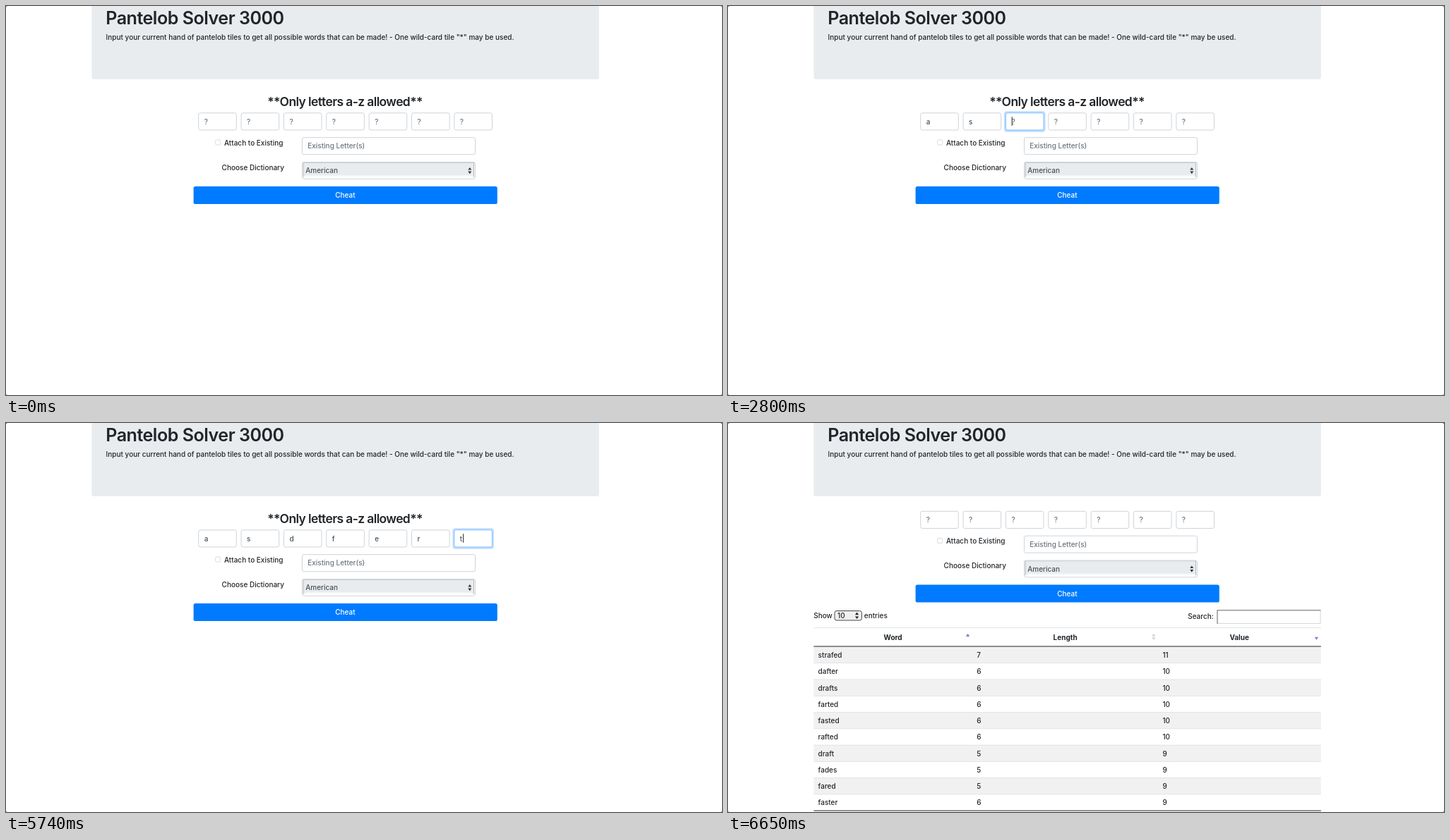
An HTML page for the animation above (8 s loop, 1014 by 552 pixels).

```html
<!DOCTYPE html>
<html lang="en">
<head>
<meta charset="utf-8">
<title>Word finder</title>
<style>
  html, body { margin: 0; width: 100%; height: 100%; overflow: hidden; background: #fff; }
  svg { display: block; width: 1014px; height: 552px; }
  text { font: 500 10px Inter, "Open Sans", sans-serif; font-optical-sizing: none; fill: #212529; white-space: pre; }
  .h1 { font-size: 25.1px; font-weight: 600; letter-spacing: -.02em; }
  .h3 { font-size: 17.5px; font-weight: 600; letter-spacing: -.036em; }
  .mid { text-anchor: middle; }
  .th { font-weight: 700; text-anchor: middle; }
  .hint { fill: #6c757d; }
  .typed { fill: #495057; }
  .white { fill: #fff; }
</style>
</head>
<body>
<svg id="stage" viewBox="0 0 1014 552"></svg>
<script>
const LOOP = 8000, RESULTS = 6650;
const GREY = '#e8ecee';
const letters = 'asdfert';
const focusAt = [1260, 2380, 2800, 3290, 4130, 4970, 5530];
const typeAt = [2100, 2590, 3010, 3570, 4480, 5180, 5740];
const blurAt = [2380, 2800, 3290, 3780, 4970, 5530, 6440];
const advance = [6.4, 5.6, 6.8, 4.2, 6.5, 4.5, 4.3];
const words = [
  ['strafed', 7, 11], ['dafter', 6, 10], ['drafts', 6, 10], ['farted', 6, 10], ['fasted', 6, 10],
  ['rafted', 6, 10], ['draft', 5, 9], ['fades', 5, 9], ['fared', 5, 9], ['faster', 6, 9]
];

const rect = (x, y, w, h, fill, extra = '') =>
  `<rect x="${x}" y="${y}" width="${w}" height="${h}" fill="${fill}" ${extra}/>`;
const text = (x, y, s, cls = '') => `<text x="${x}" y="${y}" class="${cls}">${s}</text>`;
const path = (d, fill) => `<path d="${d}" fill="${fill}"/>`;
const up = (x, y, r, h, fill) => path(`M${x - r} ${y}h${2 * r}l${-r} ${-h}z`, fill);
const down = (x, y, r, h, fill) => path(`M${x - r} ${y}h${2 * r}l${-r} ${h}z`, fill);
const field = (x, y, w, h, stroke = '#ced4da') =>
  rect(x, y, w, h, '#fff', `rx="2.4" stroke="${stroke}"`);

function header() {
  return rect(0, 0, 1014, 552, '#555') + rect(0, 0, 1014, 552, '#fff', 'rx="2.6"') +
    rect(121.4, -10, 718.4, 114, GREY, 'rx="3"') +
    text(141.2, 26.2, 'Pantelob Solver 3000', 'h1') +
    text(141.6, 47.8, 'Input your current hand of pantelob tiles to get all possible words that can be made! - One wild-card tile "*" may be used.');
}

function tile(i, t) {
  const x = 272.7 + 60.36 * i, tx = x + 8;
  const focused = t >= focusAt[i] && t < blurAt[i];
  const typed = t < RESULTS && t >= typeAt[i];
  const since = t - (typed ? typeAt[i] : focusAt[i]);
  let s = '';
  if (focused) s += rect(x - 2.5, 149.2, 58.6, 29.6, '#bfdeff', 'rx="4"');
  s += field(x, 151.8, 53.6, 24.2, focused ? '#80bdff' : '#ced4da');
  s += text(tx, 167.5, typed ? letters[i] : '?', typed ? 'typed' : 'hint');
  if (focused && since < 560) s += rect(tx + (typed ? advance[i] : .3), 157.2, 1, 12.6, '#222');
  return s;
}

function form(t) {
  const button = t < 6160 || t >= RESULTS ? '#007bff' : t >= 6440 && t < 6510 ? '#0064d0' : '#0069d9';
  return [...letters].map((_, i) => tile(i, t)).join('') +
    rect(296.6, 190, 7, 7, '#fff', 'rx="1.4" stroke="#d2d2d2" stroke-width=".8"') +
    text(309, 197.8, 'Attach to Existing') +
    field(419.5, 186.7, 245, 24) +
    text(427.2, 202.3, 'Existing Letter(s)', 'hint') +
    text(305.6, 232.8, 'Choose Dictionary') +
    field(419.5, 221.5, 245, 23.8) +
    rect(420.8, 222.3, 242, 19.5, GREY) +
    rect(424, 240.3, 236, 1.5, '#f8f9fa') +
    rect(420.6, 222.3, 1, 20.5, '#b4b8bc') + rect(662, 222.3, 1, 20.5, '#b4b8bc') +
    rect(420.6, 222, 242.4, .8, '#c3c7cb') +
    text(424.2, 237, 'American', 'typed') +
    up(656.8, 232.6, 2.5, 3.6, '#333') + down(656.8, 234.6, 2.5, 3.6, '#333') +
    rect(265.6, 256, 430.2, 25, button, 'rx="2.6"') +
    text(480.4, 272.2, 'Cheat', 'white mid');
}

function table() {
  const top = 317.4, pitch = 23.27;
  const rows = words.map(([word, length, value], i) => {
    const y = top + pitch * i;
    return (i % 2 ? '' : rect(121.4, y, 718.4, pitch, '#f1f1f1')) +
      (i ? rect(121.4, y - .3, 718.4, .7, '#d9dcdf') : '') +
      text(127.6, y + 15.6, word) + text(352.2, y + 15.6, length) + text(615.4, y + 15.6, value);
  }).join('');
  return text(121.2, 276.8, 'Show') +
    rect(151, 266.6, 38.4, 13.4, '#f0f0f0', 'rx="2.8" stroke="#444"') +
    text(155, 276.8, '10') +
    up(182.6, 272.2, 2.6, 3.6, '#222') + down(182.6, 274.4, 2.6, 3.6, '#222') +
    text(192.8, 276.8, 'entries') +
    text(651.2, 278, 'Search:') +
    rect(693, 265.8, 146, 18.6, '#fff', 'stroke="#d4d4d4"') +
    path('M692.5 265.3h147v1h-146v18.6h-1z', '#777') +
    rect(121.4, 290.3, 718.4, .8, '#d9dcdf') +
    text(233.6, 307.8, 'Word', 'th') + text(477.6, 307.8, 'Length', 'th') + text(724.2, 307.8, 'Value', 'th') +
    up(339.6, 303, 2.6, 4.2, '#7a80de') +
    up(602.8, 302.8, 2.6, 3.8, '#d2d2d2') + down(602.8, 304.2, 2.6, 3.8, '#d2d2d2') +
    down(833.4, 303.8, 2.6, 4.2, '#7a80de') +
    rows +
    rect(121.4, 316.5, 718.4, 1, '#222') + rect(121.4, 549.6, 718.4, 1, '#222');
}

function scene(t) {
  if (t >= RESULTS) return header() + `<g transform="translate(0 -26.5)">${form(t)}</g>` + table();
  return header() + text(480, 142.4, '**Only letters a-z allowed**', 'h3 mid') + form(t);
}

const stage = document.getElementById('stage');
const start = performance.now();
let shown = '';
function frame() {
  const next = scene((performance.now() - start) % LOOP);
  if (next !== shown) stage.innerHTML = shown = next;
  requestAnimationFrame(frame);
}
frame();
</script>
</body>
</html>
```
